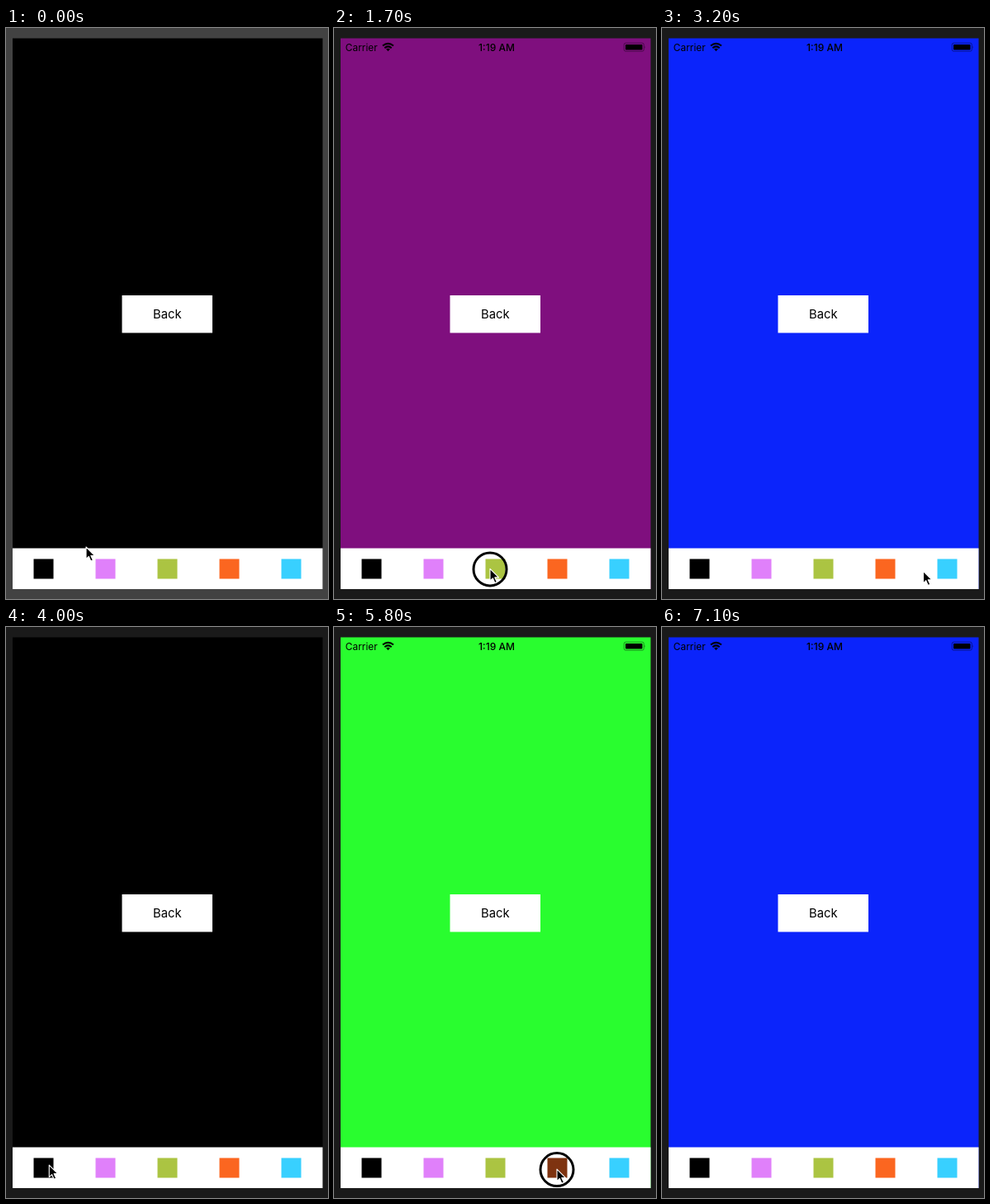
Animation, 390 px wide and 692 px high, one loop 7600 ms. Source, as an HTML page:

```html
<!DOCTYPE html>
<html lang="en">
<head>
<meta charset="utf-8">
<style>
  html, body { margin: 0; width: 100%; height: 100%; overflow: hidden; background: #1a1a1a; }
  svg { display: block; width: 390px; height: 692px; }
  text { font-family: Inter, "Liberation Sans", sans-serif; text-anchor: middle; }
</style>
</head>
<body>
<svg viewBox="0 0 390 692">
  <rect id="desk" width="390" height="692"/>
  <rect id="screen" x="8" y="12.5" width="375.5" height="667.5"/>

  <g id="status">
    <text x="33.3" y="27.8" font-size="11.9">Carrier</text>
    <text x="197" y="27.8" font-size="12" font-weight="500">1:19 AM</text>
    <g fill="none" stroke="#000" stroke-width="2">
      <path d="M59 21.6Q65.5 16.2 72 21.6"/>
      <path d="M61.3 24.2Q65.5 20.6 69.7 24.2"/>
    </g>
    <path d="M63.1 25.6Q65.5 23.7 67.9 25.6L65.5 28.2Z"/>
    <rect x="351.3" y="18.2" width="24" height="10" rx="2" fill="none" stroke="#000" stroke-opacity=".4"/>
    <rect x="353" y="20" width="20.5" height="6.5" rx=".8"/>
    <path d="M376.3 21.5q1.6 1.7 0 3.5z" fill-opacity=".4"/>
  </g>

  <rect x="140.5" y="324" width="109.5" height="45.5" fill="#fff"/>
  <text x="195.4" y="352" font-size="14.8">Back</text>

  <rect x="8" y="630.5" width="375.5" height="49.5" fill="#fff"/>
  <g id="tabs"></g>

  <circle id="ring" r="20" fill="none" stroke="#000" stroke-width="3"/>
  <path id="cursor" d="M0 0V14.5L3.3 11.4L5.8 17.1L8.4 16L5.8 10.5H10.5Z"
        stroke="#fff" stroke-width="1.1" stroke-linejoin="round"/>
</svg>
<script>
const LOOP = 7600, STEP = 100, HOLD = 200, FOCUS = 900, HIDE = 7000;
const $ = id => document.getElementById(id);
const show = (id, on) => $(id).style.display = on ? '' : 'none';

// Each tab: icon colour, pressed colour, screen colour, where the pointer taps
const tabs = [
  { icon: '#000', pressed: '#000', screen: '#000', aim: 47 },
  { icon: '#e080fa', pressed: '#70407d', screen: '#7f0f7e', aim: 118 },
  { icon: '#abc442', pressed: '#566221', screen: '#29fd2f', aim: 189 },
  { icon: '#fb6620', pressed: '#7e3310', screen: '#fd8008', aim: 270 },
  { icon: '#38d0ff', pressed: '#1c6880', screen: '#0b24fb', aim: 338 }
];
tabs.forEach((tab, i) => {
  tab.rect = document.createElementNS('http://www.w3.org/2000/svg', 'rect');
  const place = { x: 33.5 + 75 * i, y: 643.5, width: 24, height: 24 };
  for (const key in place) tab.rect.setAttribute(key, place[key]);
  $('tabs').appendChild(tab.rect);
});

// The tabs are tapped from left to right, twice
const taps = [FOCUS, 1300, 1700, 2200, 2900, 3700, 4500, 5200, 5700, 6400].map((down, i) => {
  const n = i % tabs.length;
  return { tab: tabs[n], down, up: down + HOLD, change: down + HOLD + STEP, x: tabs[n].aim, y: 652 + 1.7 * n };
});

// The pointer visits the Back button, rests on each tap, then leaves upwards
const stops = [
  { t: 0, x: 97, y: 629 },
  { t: 400, x: 181, y: 343 },
  ...taps.flatMap(({ down, up, x, y }) => [{ t: down, x, y }, { t: up, x, y }]),
  { t: 6900, x: 372, y: 332 }
];

function pointer(t) {
  const next = stops.findIndex(s => s.t > t);
  if (next < 0) return stops[stops.length - 1];
  const a = stops[next - 1], b = stops[next];
  const u = (t - a.t) / (b.t - a.t), e = u * u * (3 - 2 * u);
  return { x: a.x + (b.x - a.x) * e, y: a.y + (b.y - a.y) * e };
}

function draw(t) {
  const touch = taps.find(p => t >= p.down && t < p.up);
  const pressed = taps.find(p => t >= p.down + STEP && t < p.change);
  const last = taps.filter(p => t >= p.change).pop();
  const current = last ? last.tab : tabs[0];

  $('desk').setAttribute('fill', t < FOCUS ? '#424242' : '#1a1a1a');
  $('screen').setAttribute('fill', current.screen);
  for (const tab of tabs)
    tab.rect.setAttribute('fill', pressed && pressed.tab === tab ? tab.pressed : tab.icon);

  const { x, y } = pointer(t);
  $('cursor').setAttribute('transform', `translate(${x} ${y})`);
  $('ring').setAttribute('cx', x);
  $('ring').setAttribute('cy', y + 0.5);
  show('cursor', t < HIDE);
  show('ring', touch);
}

const start = performance.now();
function tick() {
  const t = (performance.now() - start) % LOOP;
  draw(Math.floor(t / STEP) * STEP);
  requestAnimationFrame(tick);
}
draw(0);
requestAnimationFrame(tick);
</script>
</body>
</html>
```
